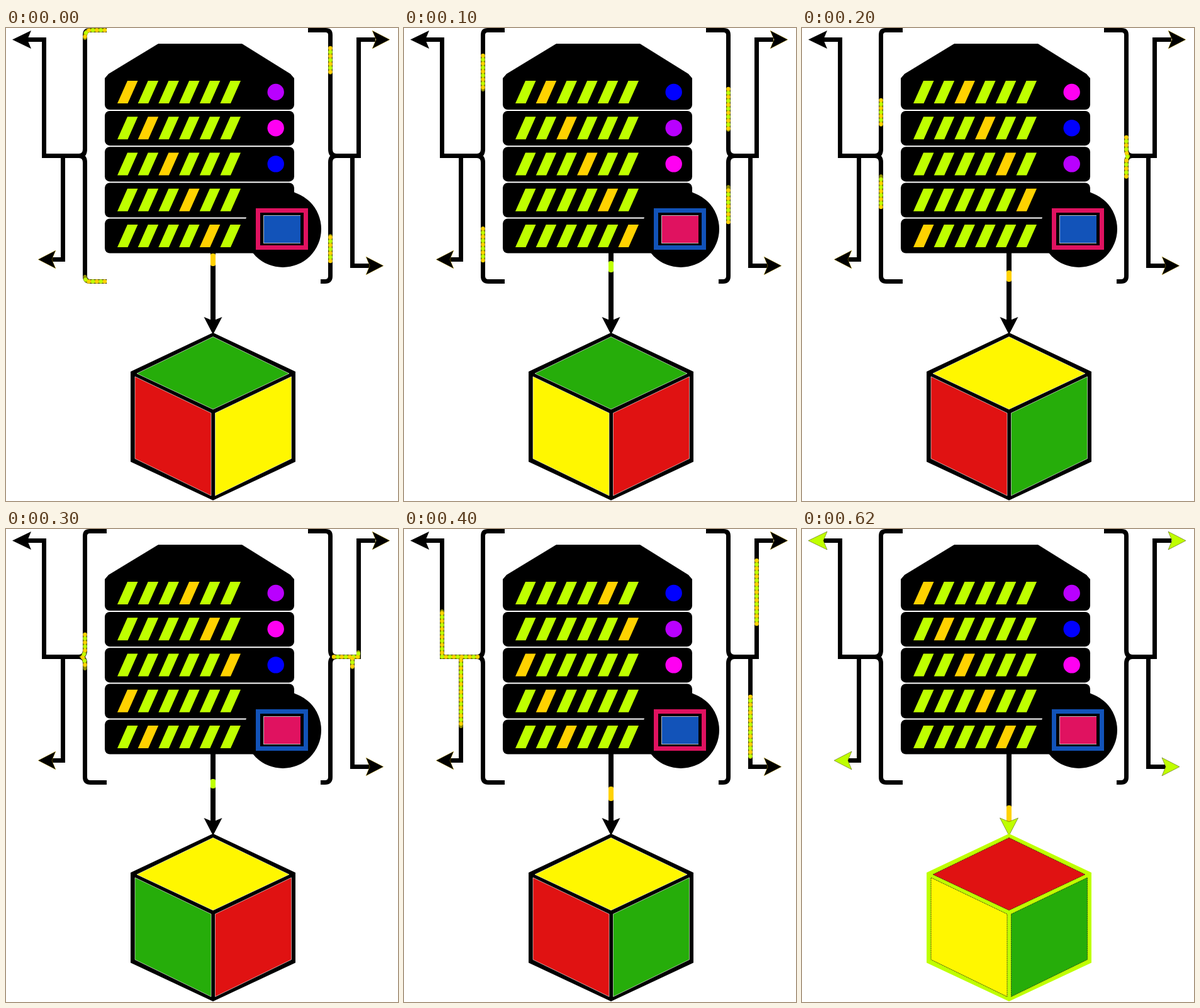
Write an HTML page with a canvas that moves like this. It is 623 px wide and 753 px high and loops after 0.7 s.

```html
<!DOCTYPE html>
<html lang="en">
<head>
<meta charset="utf-8">
<title>Server flow</title>
<style>
  html, body { margin: 0; width: 100%; height: 100%; overflow: hidden; background: #fff; }
  canvas { display: block; }
</style>
</head>
<body>
<canvas id="stage" width="623" height="753"></canvas>
<script>
const ctx = document.getElementById('stage').getContext('2d');
const LOOP = 700, STEP = 100, LAST = 5;
const LIME = '#bfff00', GOLD = '#ffd200';
const GREEN = '#26ad0a', RED = '#e01212', YELLOW = '#fff700';
const PINK = '#e01260', BLUE = '#1253b9';
const PURPLE = '#b900ff', MAGENTA = '#ff00f2', INDIGO = '#0000ff';

const lights = [
  [PURPLE, MAGENTA, INDIGO], [INDIGO, PURPLE, MAGENTA], [MAGENTA, INDIGO, PURPLE],
  [PURPLE, MAGENTA, INDIGO], [INDIGO, PURPLE, MAGENTA], [PURPLE, INDIGO, MAGENTA]
];
// top, left, right
const cubeColors = [
  [GREEN, RED, YELLOW], [GREEN, YELLOW, RED], [YELLOW, RED, GREEN],
  [YELLOW, GREEN, RED], [YELLOW, RED, GREEN], [RED, YELLOW, GREEN]
];
// start, end and colour of the pulse on the downward arrow
const pulses = [
  [359, 379, GOLD], [371, 389, LIME], [386, 404, GOLD],
  [398, 413, LIME], [410, 433, GOLD], [440, 467, GOLD]
];
// bead strings travelling along the brackets and arms
const beads = [
  ['M157 3.5H134Q125.5 3.5 125.5 16', 'M157 403.5H132Q126 403.5 125.5 396', 'M515.5 32V71', 'M515.5 371V331'],
  ['M125.5 44V98', 'M125.5 370V319', 'M515.5 97V162', 'M515.5 309V253'],
  ['M125.5 115V154', 'M125.5 285V236', 'M515.5 174V194Q516 201 518 203.5Q516 207 515.5 213V237'],
  ['M125.5 168V193Q125 200 121 203.5Q125 207 125.5 214V222', 'M521 203.5H560V196', 'M550.5 206V220'],
  ['M117 203.5H60.5V131', 'M90.5 209V314', 'M560.5 151V50', 'M550.5 267V363']
].map(set => set.map(d => new Path2D(d)));

const wires = [
  'M160 3.5H133Q125.5 3.5 125.5 11V193Q125.5 203.5 116 203.5',
  'M116 203.5Q125.5 203.5 125.5 214V395Q125.5 403.5 134 403.5H160',
  'M480 3.5H508Q515.5 3.5 515.5 11V193Q515.5 203.5 525 203.5',
  'M525 203.5Q515.5 203.5 515.5 214V395Q515.5 403.5 507 403.5H500',
  'M120 203.5H60.5V18.5H33', 'M90.5 203.5V368.5H73',
  'M521 203.5H560.5V18.5H587', 'M550.5 203.5V378.5H578'
].map(d => new Path2D(d));

const heads = [
  [10, 18.5, 0, 30], [51, 368.5, 0, 28],
  [610, 18.5, Math.PI, 28], [600, 378.5, Math.PI, 28],
  [329, 488, Math.PI / 2 * 3 + Math.PI * 2, 28]
];

function poly(points, fill) {
  ctx.beginPath();
  points.forEach(([x, y]) => ctx.lineTo(x, y));
  ctx.closePath();
  ctx.fillStyle = fill;
  ctx.fill();
}

function box(x, y, w, h, fill) {
  ctx.fillStyle = fill;
  ctx.fillRect(x, y, w, h);
}

function disc(x, y, r, fill) {
  ctx.beginPath();
  ctx.arc(x, y, r, 0, Math.PI * 2);
  ctx.fillStyle = fill;
  ctx.fill();
}

function panel(x, y, w, h, r) {
  ctx.beginPath();
  ctx.roundRect(x, y, w, h, r);
  ctx.fillStyle = '#000';
  ctx.fill();
}

function arrowHead([x, y, angle, size], i, lit) {
  ctx.save();
  ctx.translate(x, y);
  ctx.rotate(angle);
  poly([[0, 0], [size, -14.5], [size - 6, 0], [size, 14.5]], lit ? LIME : '#000');
  ctx.lineWidth = 0.7;
  ctx.strokeStyle = lit ? 'rgba(60,60,0,.7)' : 'rgba(255,210,0,.5)';
  if (lit || (i > 0 && i < 4)) ctx.stroke();
  ctx.restore();
}

function drawBeads(path) {
  ctx.save();
  ctx.lineCap = 'round';
  ctx.lineWidth = 6;
  ctx.strokeStyle = '#8c8c00';
  ctx.stroke(path);
  [GOLD, LIME].forEach((color, i) => {
    ctx.setLineDash([0.01, 12.6]);
    ctx.lineDashOffset = i * 6.3;
    ctx.lineWidth = 6.4;
    ctx.strokeStyle = color;
    ctx.stroke(path);
  });
  ctx.restore();
}

function drawServer(step) {
  poly([[242, 25], [375, 25], [452, 73], [458, 80], [458, 110], [157, 110], [157, 80], [163, 73]], '#000');
  panel(157, 95, 301, 35, [0, 0, 8, 8]);
  for (let r = 1; r < 4; r++) panel(157, 74.8 + r * 57.2, 301, 55.2, r < 3 ? 8 : [8, 8, 0, 8]);
  panel(157, 303.5, 255, 55, 8);
  disc(440, 320, 61, '#000');

  for (let r = 0; r < 5; r++) {
    const y = 84 + r * 57.25;
    const hot = (r + step % 5) % 6;
    for (let c = 0; c < 6; c++) {
      const x = 177 + c * 32.7;
      poly([[x + 16, y], [x + 32.5, y], [x + 16.5, y + 36], [x, y + 36]], c === hot ? GOLD : LIME);
    }
  }
  lights[step].forEach((color, i) => disc(428.7, 102 + i * 57.2, 13.2, color));

  const [frame, glass] = step % 2 ? [BLUE, PINK] : [PINK, BLUE];
  box(397, 287, 83, 66, frame);
  box(404, 294, 69, 52, '#000');
  box(409, 298, 59, 45, '#bbb');
  box(410, 299, 58, 43, glass);
}

function drawCube(step) {
  const lit = step === LAST;
  const faces = [
    [[329, 491.5], [450, 550], [329, 607], [208, 550]],
    [[205, 555], [326, 613], [326, 744.5], [205, 685.5]],
    [[332.5, 613], [453.5, 555], [453.5, 685.5], [332.5, 744.5]]
  ];
  poly([[329, 485], [460, 547], [460, 690.5], [329, 752], [198, 690.5], [198, 547]], lit ? LIME : '#000');
  ctx.save();
  ctx.lineWidth = 1;
  ctx.strokeStyle = lit ? 'rgba(30,30,30,.8)' : 'rgba(255,255,255,.6)';
  if (lit) ctx.setLineDash([2, 1]);
  faces.forEach((face, i) => {
    poly(face, cubeColors[step][i]);
    ctx.stroke();
  });
  ctx.restore();
}

function draw(time) {
  const step = Math.min(LAST, Math.floor(time % LOOP / STEP));
  const lit = step === LAST;
  box(0, 0, 623, 753, '#fff');

  ctx.strokeStyle = '#000';
  ctx.lineWidth = 7;
  wires.forEach(w => ctx.stroke(w));
  box(325, 355, 8, 112, '#000');
  drawServer(step);

  const [top, bottom, color] = pulses[step];
  ctx.beginPath();
  ctx.roundRect(325, top, 8, bottom - top, 3);
  ctx.fillStyle = color;
  ctx.fill();

  (beads[step] || []).forEach(drawBeads);
  heads.forEach((h, i) => arrowHead(h, i, lit));
  drawCube(step);
}

let start;
function tick(now) {
  start ??= now;
  draw(now - start);
  requestAnimationFrame(tick);
}
draw(0);
requestAnimationFrame(tick);
</script>
</body>
</html>
```
